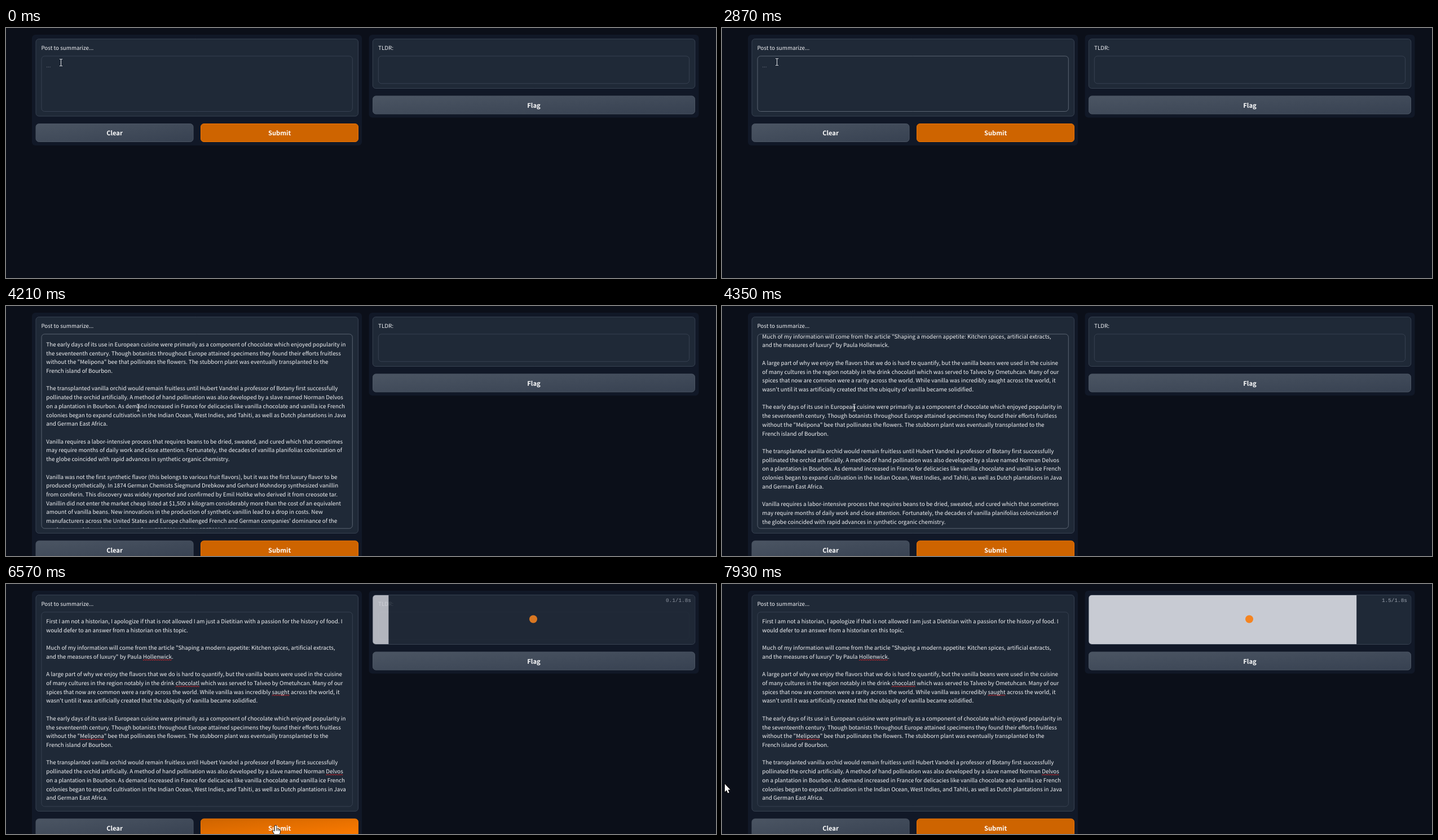
Write an HTML page with a canvas that moves like this. It is 1259x445 px and loops after 7.99 s.

```html
<!DOCTYPE html>
<html lang="en">
<head>
<meta charset="utf-8">
<title>Post summarizer</title>
<style>
  html, body { margin: 0; width: 100%; height: 100%; overflow: hidden; background: #0b0f19; }
  canvas { display: block; width: 1259px; height: 445px; }
</style>
</head>
<body>
<canvas id="stage"></canvas>
<script>
const W = 1259, H = 445, LOOP = 7990;
const PASTE = 3300, SPELL = 6210, BLUR = 6390, LOAD = 6487, ETA = 1.8;
const PITCH = 15.714, SCROLL_END = 274.6, TEXT_X = 71.3;
const SANS = '"Noto Sans CJK JP", "Noto Sans CJK SC", "Noto Sans CJK", "Open Sans", sans-serif';
const BODY = `9.82px ${SANS}`, BOLD = `700 11.2px ${SANS}`;
const MONO = '9.4px "Liberation Mono", monospace';

const LINES = `First I am not a historian, I apologize if that is not allowed I am just a Dietitian with a passion for the history of food. I
would defer to an answer from a historian on this topic.

Much of my information will come from the article "Shaping a modern appetite: Kitchen spices, artificial extracts,
and the measures of luxury" by Paula Hollenwick.

A large part of why we enjoy the flavors that we do is hard to quantify, but the vanilla beans were used in the cuisine
of many cultures in the region notably in the drink chocolatl which was served to Talveo by Ometuhcan. Many of our
spices that now are common were a rarity across the world. While vanilla was incredibly saught across the world, it
wasn't until it was artificially created that the ubiquity of vanilla became solidified.

The early days of its use in European cuisine were primarily as a component of chocolate which enjoyed popularity in
the seventeenth century. Though botanists throughout Europe attained specimens they found their efforts fruitless
without the "Melipona" bee that pollinates the flowers. The stubborn plant was eventually transplanted to the
French island of Bourbon.

The transplanted vanilla orchid would remain fruitless until Hubert Vandrel a professor of Botany first successfully
pollinated the orchid artificially. A method of hand pollination was also developed by a slave named Norman Delvos
on a plantation in Bourbon. As demand increased in France for delicacies like vanilla chocolate and vanilla ice French
colonies began to expand cultivation in the Indian Ocean, West Indies, and Tahiti, as well as Dutch plantations in Java
and German East Africa.

Vanilla requires a labor-intensive process that requires beans to be dried, sweated, and cured which that sometimes
may require months of daily work and close attention. Fortunately, the decades of vanilla planifolias colonization of
the globe coincided with rapid advances in synthetic organic chemistry.

Vanilla was not the first synthetic flavor (this belongs to various fruit flavors), but it was the first luxury flavor to be
produced synthetically. In 1874 German Chemists Siegmund Drebkow and Gerhard Mohndorp synthesized vanillin
from coniferin. This discovery was widely reported and confirmed by Emil Holtke who derived it from creosote tar.
Vanillin did not enter the market cheap listed at $1,500 a kilogram considerably more than the cost of an equivalent
amount of vanilla beans. New innovations in the production of synthetic vanillin lead to a drop in costs. New
manufacturers across the United States and Europe challenged French and German companies' dominance of the
market caused the price to plummet from 560DM in 1896 to 126DM in 1897.

By 1900 the US saw a rapid increase in the sale of both vanilla beans and synthetic vanilla corresponding to the
expanding role of sweet foods in American life. Technological innovations created the ability to manufacture ice
creams, chocolates, and other confectionary items on a large scale at a low price. Both artificial vanilla and vanilla
beans prices continued to decrease throughout the early 20th century. Sugary vanilla flavored treats became
everyday indulgences due to the wide availability of cheap sugar and artificial vanilla.`.split('\n');
const MISSPELLED = ['Hollenwick', 'chocolatl', 'saught', 'Melipona', 'Delvos'];

// Pointer path: time, x, y of the hot spot
const PATH = [
  [0, 97.5, 61.5], [59, 97.5, 61.5], [60, 97.5, 60.5], [3760, 97.5, 60.5],
  [4000, 234.5, 181], [4560, 234.5, 181], [4680, 226, 200], [5220, 464, 429.5],
  [5460, 464, 429.5], [5700, 478, 430], [6640, 478, 430], [7170, 130, 366], [7930, 5, 356]
];

const canvas = document.getElementById('stage');
const dpr = window.devicePixelRatio || 1;
canvas.width = Math.round(W * dpr);
canvas.height = Math.round(H * dpr);
const ctx = canvas.getContext('2d');

const clamp = v => Math.min(1, Math.max(0, v));
const smooth = v => v * v * (3 - 2 * v);
const within = (t, a, b) => t >= a && t < b;
const inside = (p, x, y, w, h) => p.x >= x && p.x < x + w && p.y >= y && p.y < y + h;

function box(x, y, w, h, r, fill, stroke) {
  ctx.beginPath();
  ctx.roundRect(x, y, w, h, r);
  if (fill) { ctx.fillStyle = fill; ctx.fill(); }
  if (stroke) { ctx.strokeStyle = stroke; ctx.lineWidth = 1; ctx.stroke(); }
}

function text(str, x, y, font, color, align = 'left') {
  ctx.font = font;
  ctx.fillStyle = color;
  ctx.textAlign = align;
  ctx.fillText(str, x, y);
}

// Gradient from the top left to the bottom right corner, as CSS lays it out
function diagonal(x, y, w, h, from, to) {
  const k = w * h / (w * w + h * h), cx = x + w / 2, cy = y + h / 2;
  const g = ctx.createLinearGradient(cx - h * k, cy - w * k, cx + h * k, cy + w * k);
  g.addColorStop(0, from);
  g.addColorStop(1, to);
  return g;
}

function button(label, x, y, w, from, to, edge) {
  box(x + .5, y + .5, w - 1, 32, 5.5, diagonal(x, y, w, 33, from, to), edge);
  text(label, x + w / 2, y + 21, BOLD, '#fff', 'center');
}

function grayButton(label, x, y, w) {
  button(label, x, y, w, '#4b5563', '#374151', '#4b5563');
}

function pointerAt(t) {
  let i = PATH.length - 1;
  while (i > 0 && PATH[i][0] > t) i--;
  const a = PATH[i], b = PATH[i + 1] || a;
  const k = b === a ? 0 : smooth((t - a[0]) / (b[0] - a[0]));
  return { x: a[1] + (b[1] - a[1]) * k, y: a[2] + (b[2] - a[2]) * k };
}

function squiggle(x, y, w) {
  ctx.beginPath();
  for (let d = 0; d <= w; d += 1) ctx.lineTo(x + d, y + .6 * Math.sin(d * 1.57));
  ctx.strokeStyle = '#e0262c';
  ctx.lineWidth = 1;
  ctx.stroke();
}

function caret(x, y) {
  ctx.fillStyle = '#f3f4f6';
  ctx.fillRect(Math.round(x), y, 1, 14.5);
}

function post(t) {
  const scroll = SCROLL_END * (1 - smooth(clamp((t - 4004) / 496)));
  ctx.save();
  ctx.beginPath();
  ctx.rect(63.5, 50.5, 550.5, 345);
  ctx.clip();
  LINES.forEach((line, i) => {
    const y = 70 + i * PITCH - scroll;
    if (y < 40 || y > 410) return;
    text(line, TEXT_X, y, BODY, '#f3f4f6');
    if (t < SPELL) return;
    for (const word of MISSPELLED) {
      const at = line.indexOf(word);
      if (at < 0) continue;
      squiggle(TEXT_X + ctx.measureText(line.slice(0, at)).width, y + 2.3, ctx.measureText(word).width);
    }
  });
  if (t < 3800) {
    ctx.font = BODY;
    caret(TEXT_X + ctx.measureText(LINES[LINES.length - 1]).width, 381);
  }
  ctx.restore();
}

function inputPanel(t, p) {
  const pasted = t >= PASTE, grow = pasted ? 247.5 : 0, top = 170 + grow;
  const focused = within(t, 240, BLUR);
  box(46, 12, 585, 197 + grow, 6, '#111827');
  box(53, 19.5, 571.5, 137.5 + grow, 5.5, '#1f2937', '#374151');
  text('Post to summarize...', 62.4, 38.8, BODY, '#f0f1f4');
  box(63, 50, 551.3, 98.5 + grow, 5.5, null, focused ? '#5b6472' : '#374151');
  if (pasted) post(t);
  else {
    text('...', TEXT_X, 70, BODY, '#6b7280');
    if (within(t, 240, 730) || within(t, 1260, 1810) || within(t, 2310, 2870)) caret(71, 59);
  }
  grayButton('Clear', 52.5, top, 280);
  const hover = inside(p, 345, top, 280, 33);
  button('Submit', 345, top, 280, '#ce6400', hover ? '#ff7c00' : '#ce6400', '#ee7400');
}

function progress(t) {
  const share = clamp((t - LOAD) / 1735), edge = 651 + 570 * share;
  ctx.save();
  ctx.globalAlpha = clamp((t - 6400) / 196);
  ctx.beginPath();
  ctx.roundRect(650.5, 20, 571, 87, 5);
  ctx.clip();
  ctx.fillStyle = '#c8cbd3';
  ctx.fillRect(650, 20, edge - 650, 87);
  ctx.fillStyle = '#1f2937';
  ctx.fillRect(edge, 20, 1222 - edge, 87);
  ctx.beginPath();
  ctx.arc(935, 62.5, 7, 0, Math.PI * 2);
  ctx.fillStyle = '#f58420';
  ctx.fill();
  text(`${(share * ETA).toFixed(1)}/${ETA}s`, 1215, 32.3, MONO, '#9ca3af', 'right');
  ctx.restore();
}

function outputPanel(t) {
  box(643.5, 12, 585, 147.5, 6, '#111827');
  box(650.3, 19.5, 571.5, 88, 5.5, '#1f2937', '#374151');
  text('TLDR:', 660, 38.8, BODY, '#f0f1f4');
  box(660.3, 50, 551.3, 48.8, 5.5, null, '#374151');
  if (t >= BLUR) progress(t);
  grayButton('Flag', 650, 120.5, 572);
}

function outline(path) {
  ctx.lineJoin = 'round';
  ctx.strokeStyle = '#000';
  ctx.lineWidth = 1.6;
  ctx.stroke(path);
  ctx.fillStyle = '#fff';
  ctx.fill(path);
}

const ARROW = new Path2D('M0 0V14L3.2 11L5.4 16.2L7.8 15.2L5.6 10.2H9.8Z');
const HAND = new Path2D('M-1.4 1Q0 -1 1.4 1V6L4 6.2L6.4 7L8 8.2V12L6.6 16H-1.4L-4.6 11Q-5 8.6 -3 9L-1.4 10.6Z');
const KNUCKLES = new Path2D('M1.6 6V9.4M4 6.6V9.6M6.3 7.4V10');

function beam() {
  ctx.fillStyle = '#e5e7eb';
  ctx.fillRect(-.5, -6, 1, 12);
  for (const y of [-6.5, 5.5]) {
    ctx.fillRect(-2.5, y, 2, 1);
    ctx.fillRect(.5, y, 2, 1);
  }
}

function pointer(t, p) {
  const grow = t >= PASTE ? 247.5 : 0;
  ctx.save();
  ctx.translate(p.x, p.y);
  if (inside(p, 63, 50, 551, 98.5 + grow)) {
    ctx.translate(Math.floor(p.x) + .5 - p.x, 0);
    beam();
  } else if (inside(p, 345, 170 + grow, 280, 33) || inside(p, 52.5, 170 + grow, 280, 33)) {
    outline(HAND);
    ctx.lineWidth = .8;
    ctx.stroke(KNUCKLES);
  } else outline(ARROW);
  ctx.restore();
}

function draw(t) {
  ctx.setTransform(dpr, 0, 0, dpr, 0, 0);
  ctx.textRendering = 'geometricPrecision';
  ctx.fillStyle = '#0b0f19';
  ctx.fillRect(0, 0, W, H);
  const p = pointerAt(t);
  inputPanel(t, p);
  outputPanel(t);
  pointer(t, p);
}

const start = performance.now();
function tick() {
  draw((performance.now() - start) % LOOP);
  requestAnimationFrame(tick);
}
tick();
</script>
</body>
</html>
```
